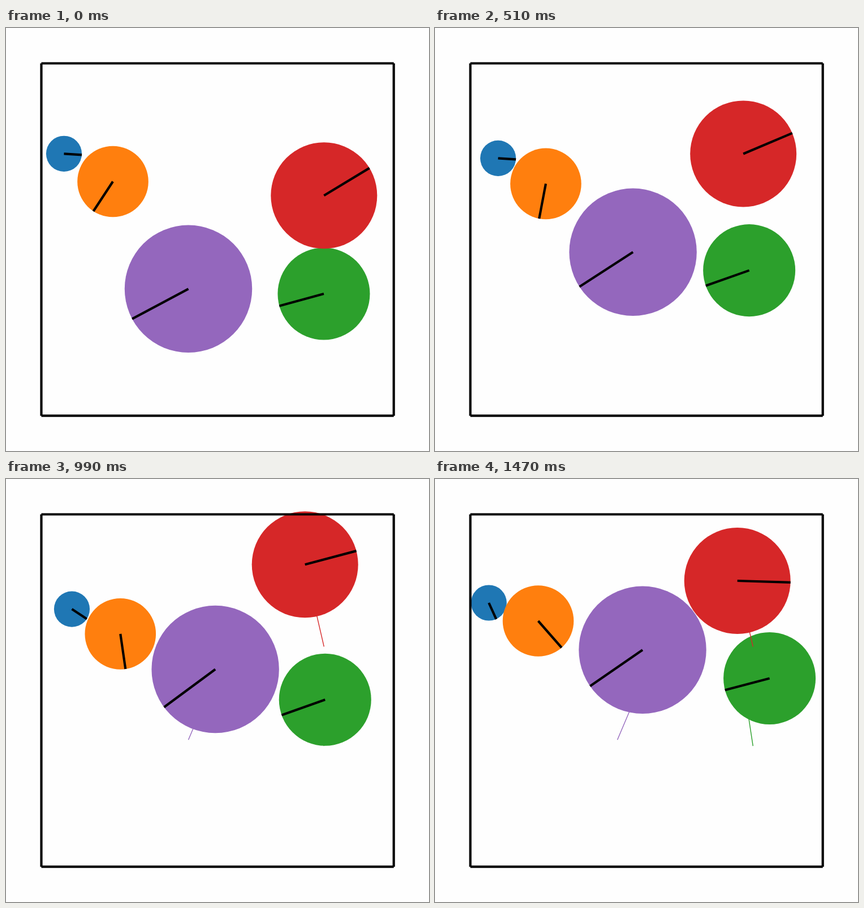
Write an HTML page with a canvas that moves like this. It is 748 px wide and 748 px high and loops after 1500 ms.

```html
<!DOCTYPE html>
<html>
<head>
<meta charset="utf-8">
<title>Bouncing discs</title>
<style>
  html, body { margin: 0; height: 100%; overflow: hidden; background: #fefefe; }
  canvas { display: block; }
</style>
</head>
<body>
<canvas id="stage" width="748" height="748"></canvas>
<script>
const ctx = document.getElementById('stage').getContext('2d');
const SIZE = 748, STEP_MS = 30, STEPS = 50, LINE = 4.2;
const WALL_MIN = 62.5, WALL_MAX = 685.7;

// Discs fly straight and spin evenly between bounces.
// A path holds the start, each main bounce and the end: [step, x, y, degrees].
const disc = (color, size, ...path) => ({ color, r: 62.4 * size + 0.4, path });
const discs = [
  disc('#1f77b4', 0.5, [0, 102.5, 222.3, 3.6], [4, 91, 230.2, -7.6], [11, 109.7, 230.4, -7.3],
    [34, 116.8, 230.1, 35], [44, 92.4, 219.5, 61.5], [49, 95.2, 219, 65.5]),
  disc('#ff7f0e', 1, [0, 189, 271.5, 123.3], [11, 190.8, 274, 106.6], [30, 207, 278.5, 88.1],
    [41, 189.7, 261.6, 64.8], [49, 182.5, 251, 48.8]),
  disc('#2ca02c', 1.3, [-0.9, 562.3, 472.2, 165], [26, 552.3, 406.7, 158.3], [49, 591.6, 352.5, 165.3]),
  disc('#d62728', 1.5, [0.4, 562.3, 296.3, -31.2], [33, 528.7, 151.3, -14.9],
    [39, 523.1, 172.7, -11.4], [49, 534.7, 180, 1.7]),
  disc('#9467bd', 1.8, [0, 322.5, 461.3, 151.9], [26, 364.7, 361.9, 144.5],
    [39, 374.8, 314.8, 142.7], [49, 367, 302.3, 145.4]),
];

function poseAt(path, step) {
  const i = Math.max(1, path.findIndex(key => key[0] >= step));
  const from = path[i - 1], to = path[i];
  const u = Math.max(0, (step - from[0]) / (to[0] - from[0]));
  return from.map((v, j) => v + (to[j] - v) * u);
}

function strokeLine(points, color, width) {
  ctx.beginPath();
  points.forEach(([x, y]) => ctx.lineTo(x, y));
  ctx.strokeStyle = color;
  ctx.lineWidth = width;
  ctx.stroke();
}

function drawDisc({ color, r, path }, step) {
  const [, x, y, degrees] = poseAt(path, step);
  const angle = degrees * Math.PI / 180;
  const passed = path.filter(key => key[0] < step).map(key => key.slice(1, 3));
  strokeLine([...passed, [x, y]], color, 1.4);
  ctx.beginPath();
  ctx.arc(x, y, r, 0, 2 * Math.PI);
  ctx.fillStyle = color;
  ctx.fill();
  strokeLine([[x, y], [x + r * Math.cos(angle), y + r * Math.sin(angle)]], '#000', LINE);
}

function drawWalls() {
  for (const side of [WALL_MIN, WALL_MAX]) {
    strokeLine([[side, WALL_MIN], [side, WALL_MAX]], '#000', LINE);
    strokeLine([[WALL_MIN, side], [WALL_MAX, side]], '#000', LINE);
  }
}

function draw() {
  const step = Math.floor(performance.now() / STEP_MS) % STEPS;
  ctx.fillStyle = '#fefefe';
  ctx.fillRect(0, 0, SIZE, SIZE);
  discs.forEach(d => drawDisc(d, step));
  drawWalls();
  requestAnimationFrame(draw);
}
draw();
</script>
</body>
</html>
```
